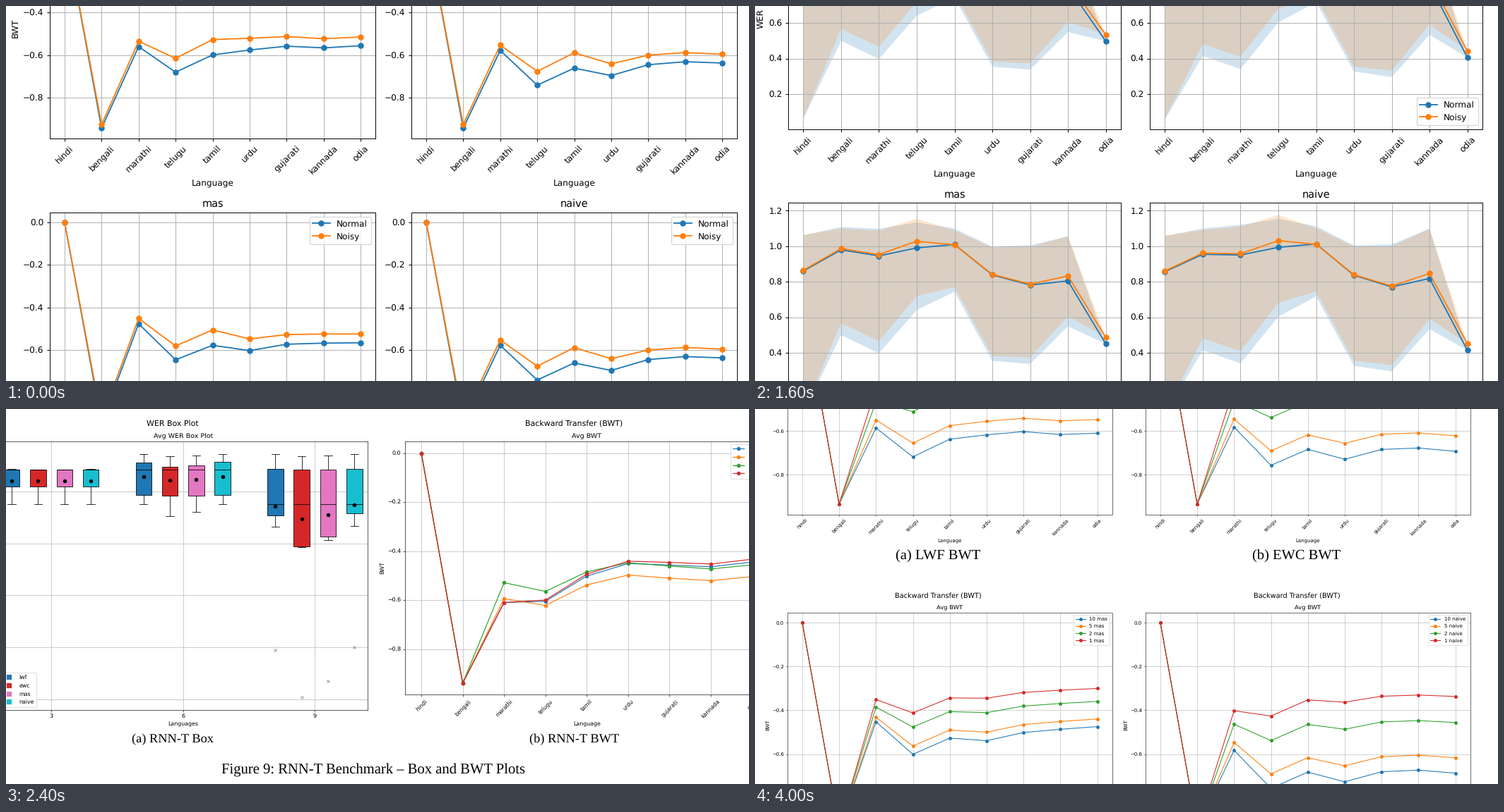
A matplotlib script for the animation above (4.8 s loop, 1052x532 px).

```python
import numpy as np
import matplotlib.pyplot as plt
from matplotlib.animation import FuncAnimation
from matplotlib.lines import Line2D
from matplotlib.ticker import MultipleLocator

W, H = 1052, 532
BLUE, RED, PINK, CYAN = "#1f77b4", "#d62728", "#e377c2", "#17becf"
LANGS = ["hindi", "bengali", "marathi", "telugu", "tamil",
         "urdu", "gujarati", "kannada", "odia"]
METHODS = ["lwf", "ewc", "mas", "naive"]
NOISE = ["Normal", "Noisy"]
EPOCHS = {10: 0, 5: 0.2, 2: 0.66, 1: 1}  # lack of training


def milli(*values):
    return np.array(values) / 1000


# Word error rates per language, and how they react to noise and short training
FIRM = milli(861, 980, 946, 991, 1010, 839, 782, 805)
LOOSE = milli(857, 955, 951, 994, 1013, 837, 771, 819)
LAST = dict(zip(METHODS, milli(498, 406, 451, 415)))
NOISE_GAP = milli(4, 7, 7, 38, -2, 3, 5, 28, 37)
TRAINED = milli(867, 941, 921, 960, 959, 838, 765, 781, 410)
LAG = milli(19, 73, 88, 76, 98, 65, 133, 224, 439)
STREAMED = milli(876, 942, 943, 972, 960, 875, 832, 854, 595)

# Spread below and above the mean, and the share of it that always stays
DROP = milli(800, 540, 610, 390, 295, 510, 475, 285, 0)
RISE = milli(200, 145, 170, 160, 100, 168, 240, 280, 0)
HOLD = milli(1000, 70, 160, 140, 190, 580, 460, 140, 0)

# Forgetting from the third language on
LOSS = {"lwf": milli(559, 679, 598, 575, 557, 565, 555),
        "ewc": milli(577, 740, 660, 695, 644, 630, 636),
        "mas": milli(476, 645, 577, 602, 572, 567, 565)}
LOSS["naive"] = LOSS["ewc"]
LOSS_GAP = milli(25, 65, 72, 55, 45, 43, 41)
STREAMED_LOSS = milli(610, 605, 502, 451, 457, 464, 445)

fig = plt.figure(figsize=(W / 100, H / 100), dpi=100, facecolor="white")
scenes = []


def noisy_wer(name, noisy):
    base = FIRM if name in ("lwf", "mas") else LOOSE
    return np.append(base, LAST[name]) + noisy * NOISE_GAP


def band(mean, shrink):
    share = 1 - (1 - HOLD) * shrink
    return mean - DROP * share, mean + RISE * share


def settle(start, end, rate):
    """Seven steps from start that level off at end."""
    return end + (start - end) * np.exp(-rate * np.arange(7))


def transfer(second, loss):
    return np.r_[0, -second, -loss]


def scene(px):
    """Start a page whose 10 pt text is px pixels high."""
    k = px * 0.072
    rc = {"font.size": 10 * k, "text.hinting": "none",
          "axes.linewidth": 0.8 * k, "axes.titlepad": 6 * k,
          "axes.labelpad": 4 * k, "lines.linewidth": 1.5 * k,
          "lines.markersize": 6 * k, "lines.markeredgewidth": k,
          "patch.linewidth": k,
          "boxplot.flierprops.markersize": 6 * k,
          "boxplot.flierprops.markeredgewidth": k,
          "boxplot.meanprops.markersize": 6 * k}
    for part in ("box", "whisker", "cap", "median"):
        rc[f"boxplot.{part}props.linewidth"] = k
    plt.rcParams.update(rc)
    scenes.append([])


def panel(box, ylim, step, title="", ylabel=""):
    """Axes on a pixel box (left, top, right, bottom)."""
    l, t, r, b = box
    k = plt.rcParams["font.size"] / 10
    ax = fig.add_axes([l / W, 1 - b / H, (r - l) / W, (b - t) / H])
    ax.set_ylim(ylim)
    ax.yaxis.set_major_locator(MultipleLocator(step))
    ax.tick_params(length=3.5 * k, width=0.8 * k, pad=3.5 * k, labelsize=10 * k)
    ax.grid(True, linewidth=0.8 * k)
    ax.set_title(title)
    ax.set_ylabel(ylabel)
    scenes[-1].append(ax)
    return ax


def quad(x, tops, dx, size, ylim, step, ylabel):
    """Two by two panels, one per method, labelled at the first."""
    for i, name in enumerate(METHODS):
        l, t = x + dx * (i % 2), tops[i // 2]
        yield name, panel((l, t, l + size[0], t + size[1]), ylim, step, name,
                          "" if i else ylabel)


def note(x, y, text, px, family="DejaVu Sans"):
    """Text centred on x with its baseline at y."""
    scenes[-1].append(fig.text(x / W, 1 - y / H, text, fontsize=px * 0.72,
                               family=family, ha="center", va="baseline"))


def caption(x, y, text, px):
    note(x, y, text, px, "Liberation Serif")


def lines(ax, rows, labels, loc=None, bands=()):
    x = np.arange(len(LANGS))
    for i, (low, high) in enumerate(bands):
        ax.fill_between(x, low, high, facecolor=f"C{i}", alpha=0.2, linewidth=0)
    for i, (row, label) in enumerate(zip(rows, labels)):
        ax.plot(x, row, "o-", color=f"C{i}", label=label)
    ax.set_xlim(-0.4, 8.4)
    ax.set_xticks(x, LANGS)
    ax.tick_params(axis="x", rotation=45)
    ax.set_xlabel("Language")
    if loc:
        ax.legend(loc=loc)


def boxes(ax, rows, colors, step, labels=None, loc=None):
    """Box plots over the first 3, 6 and 9 languages of every row."""
    ends = np.array([3, 6, 9])
    half = len(colors) * step / 2
    for i, (row, color) in enumerate(zip(rows, colors)):
        ax.boxplot([row[:n] for n in ends], positions=ends - half + (i + 0.5) * step,
                   widths=0.6 * step, patch_artist=True, showmeans=True,
                   manage_ticks=False, boxprops=dict(facecolor=color),
                   medianprops=dict(color="black"),
                   meanprops=dict(marker="o", markerfacecolor="black",
                                  markeredgecolor="black"),
                   flierprops=dict(marker="x", markeredgecolor="gray"))
    ax.set_xlim(3 - half, 9 + half)
    ax.set_xticks(ends)
    ax.set_xlabel("Languages")
    if loc:
        size = 0.9 * plt.rcParams["font.size"]
        ax.legend([Line2D([], [], marker="s", linestyle="", color="white",
                          markerfacecolor=c, markersize=size) for c in colors],
                  labels, loc=loc)


def noisy_transfer():
    scene(12.1)
    for name, ax in quad(62, (-125.8, 292.5), 512, (461, 313.3),
                         (-0.9885, 0.0473), 0.2, "BWT"):
        lines(ax, [transfer(0.942 - 0.018 * n, LOSS[name] - n * LOSS_GAP)
                   for n in (0, 1)], NOISE, "upper right")


def noisy_boxes():
    scene(12.1)
    for name, ax in quad(52, (-142.7, 275.3), 512, (471, 347.2),
                         (0.374, 1.067), 0.1, "WER"):
        boxes(ax, [noisy_wer(name, n) for n in (0, 1)], (BLUE, CYAN), 1, NOISE,
              "upper left" if name == "naive" else None)


def noisy_shaded():
    scene(12.1)
    for name, ax in quad(47, (-138.5, 279), 512, (471, 313.5),
                         (0.0016, 1.2456), 0.2, "WER"):
        rows = [noisy_wer(name, n) for n in (0, 1)]
        firm = name in ("lwf", "mas")
        lines(ax, rows, NOISE, "lower right" if name == "ewc" else None,
              [band(row, 0.12 * (firm + n)) for n, row in enumerate(rows)])


def streamed():
    scene(7.87)
    ax = panel((-10.6, 46, 512, 427), (0.4797, 0.9962), 0.1,
               "Avg WER Box Plot", "WER")
    late = np.linspace(0, 1, 9) ** 3
    boxes(ax, [STREAMED + d * late for d in milli(0, -91, -60, 5)],
          (BLUE, RED, PINK, CYAN), 0.6, METHODS, "lower left")

    ax = panel((564.6, 46, 1080, 405.2), (-0.986, 0.0475), 0.2, "Avg BWT", "BWT")
    drifts = [(0, 0), (-0.016, 0.062), (-0.081, 0.015), (0, -0.012)]
    lines(ax, [transfer(0.9395, STREAMED_LOSS + settle(*d, 0.55)) for d in drifts],
          METHODS, "upper right")

    note(236, 23.5, "WER Box Plot", 11)
    note(804.5, 23.5, "Backward Transfer (BWT)", 11)
    caption(235.5, 473.5, "(a) RNN-T Box", 18.4)
    caption(804.5, 473.5, "(b) RNN-T BWT", 18.4)
    caption(520.5, 517.5, "Figure 9: RNN-T Benchmark – Box and BWT Plots", 20.6)


def epoch_wer():
    scene(7.87)
    names = [f"{n} lwf" for n in EPOCHS]
    rows = [TRAINED + lack * LAG for lack in EPOCHS.values()]
    ax = panel((-13.7, 47, 509, 428), (0.3776, 1.0897), 0.1,
               "Avg WER Box Plot", "WER")
    boxes(ax, rows, (BLUE, RED, PINK, CYAN), 0.6, names, "lower left")

    ax = panel((554.8, 47, 1077, 406), (0.0143, 1.154), 0.2,
               "Avg WER with Shading", "WER")
    lines(ax, rows, names, "upper right",
          [band(row, 0.08 + 0.92 * lack)
           for row, lack in zip(rows, EPOCHS.values())])

    note(233, 24, "WER Box Plot", 11)
    note(801.5, 24, "WER Min/Max", 11)
    caption(233, 474, "(a) LWF Epoch Box", 18.4)
    caption(801.5, 474, "(b) LWF Epoch Shaded", 18.4)
    caption(517.5, 518, "Figure 10: LWF Epoch – Box and Shaded Plots", 20.6)


def epoch_transfer():
    scene(7)
    ramps = {"lwf": (1.05, 1.1), "ewc": (1.01, 1.09),
             "mas": (0.95, 0.84), "naive": (1.01, 1.08)}
    for name, ax in quad(46, (-170.1, 288.5), 507, (459.5, 319.6),
                         (-0.981, 0.0466), 0.2, "BWT"):
        ax.set_title("Avg BWT")
        ax.set_ylabel("BWT")
        loss = LOSS[name] * np.linspace(*ramps[name], 7)
        relief = settle(0.31, 0.51, 1) * (0.72 if name == "mas" else 1)
        lines(ax, [transfer(0.934, loss * (1 - lack * relief))
                   for lack in EPOCHS.values()],
              [f"{n} {name}" for n in EPOCHS], "upper right")
    for x in (259.5, 767):
        note(x, 268, "Backward Transfer (BWT)", 9.8)
    caption(259.5, 214, "(a) LWF BWT", 20.5)
    caption(766.5, 214, "(b) EWC BWT", 20.5)


for build in (noisy_transfer, noisy_boxes, noisy_shaded,
              streamed, epoch_wer, epoch_transfer):
    build()


def show(n):
    for i, artists in enumerate(scenes):
        for artist in artists:
            artist.set_visible(i == n)


show(0)
anim = FuncAnimation(fig, show, frames=len(scenes), interval=800,
                     init_func=lambda: show(0), repeat=True, repeat_delay=0)
plt.show()
```
